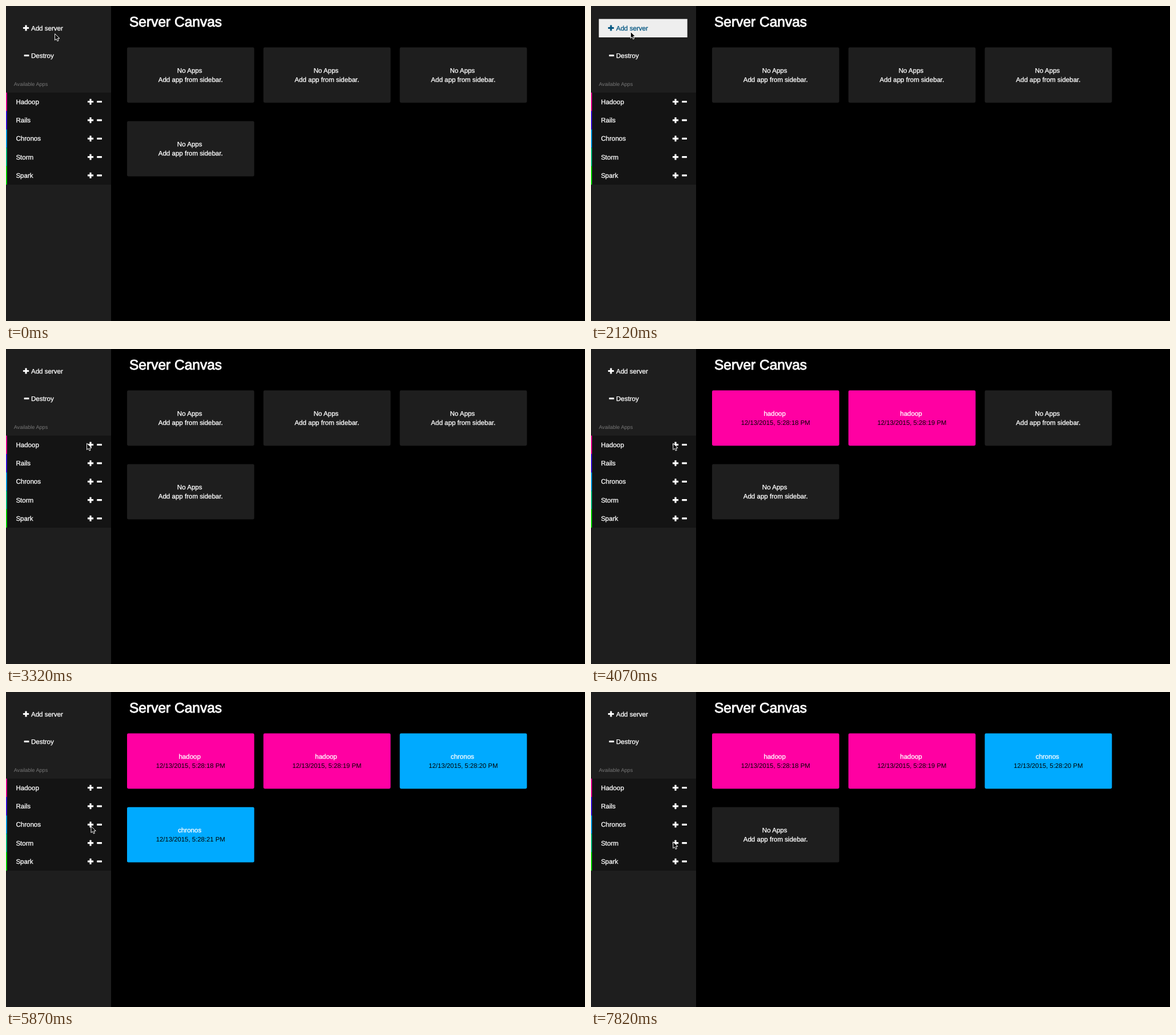
An HTML page for the animation above (8000 ms loop, 1014 by 552 pixels).

```html
<!DOCTYPE html>
<html lang="en">
<head>
<meta charset="utf-8">
<title>Server Canvas</title>
<style>
  html, body { margin: 0; width: 100%; height: 100%; overflow: hidden; background: #000; }
  svg { display: block; width: 100%; height: 100%; }
  text {
    font: 11.55px "Liberation Sans", Arial, sans-serif;
    text-rendering: geometricPrecision;
    fill: #fff; stroke: #fff; stroke-width: .3px;
  }
  .title { font-size: 24.5px; stroke-width: .9px; }
  .label { font-size: 9.1px; fill: #777; stroke: none; }
  .mid { text-anchor: middle; }
  .date { font-size: 11.35px; fill: #000; stroke: none; }
  .icon { fill: #fff; }
  .hover text { fill: #005580; stroke: #005580; }
  .hover .icon { fill: #005580; }
  .back { fill: #eee; visibility: hidden; }
  .hover .back { visibility: visible; }
</style>
</head>
<body>
<svg id="stage" viewBox="0 0 1014 552"></svg>
<script>
const LOOP = 8000, STEP = 150;
const PINK = "#ff00a2", BLUE = "#00aaff", GREY = "#1e1e1e";
const ROW = 32.28, LIST_TOP = 151.7;
const stage = document.getElementById("stage");

function add(parent, tag, attrs = {}, content = "") {
  const el = document.createElementNS("http://www.w3.org/2000/svg", tag);
  for (const key in attrs) el.setAttribute(key, attrs[key]);
  el.textContent = content;
  parent.append(el);
  return el;
}

const rect = (parent, x, y, width, height, more) =>
  add(parent, "rect", { x, y, width, height, ...more });
const label = (parent, x, y, content, cls = "") =>
  add(parent, "text", { x, y, class: cls }, content);
const bar = (parent, x, y, width, height) =>
  rect(parent, x - width / 2, y - height / 2, width, height, { rx: .6, class: "icon" });

function minus(parent, x, y) {
  bar(parent, x, y, 8.8, 3.1);
}

function plus(parent, x, y) {
  bar(parent, x, y, 10.2, 3.1);
  bar(parent, x, y, 3.1, 10.2);
}

function button(y, name, drawIcon, iconX) {
  const group = add(stage, "g");
  rect(group, 13.7, y, 155, ROW, { class: "back" });
  drawIcon(group, iconX, y + 15.8);
  label(group, 44, y + 20, name);
  return { group, y };
}

function card(x, y) {
  const group = add(stage, "g");
  return {
    group,
    box: rect(group, x, y, 222.7, 96.8, { rx: 2.4 }),
    head: label(group, x + 109.7, y + 44.4, "", "mid"),
    foot: label(group, x + 111.2, y + 60.4, "")
  };
}

function setCard({ group, box, head, foot }, app, second) {
  group.setAttribute("visibility", app === "gone" ? "hidden" : "visible");
  const empty = !app || app === "gone";
  box.setAttribute("fill", empty ? GREY : app === "hadoop" ? PINK : BLUE);
  head.textContent = empty ? "No Apps" : app;
  foot.textContent = empty ? "Add app from sidebar." : `12/13/2015, 5:28:${second} PM`;
  foot.setAttribute("class", empty ? "mid" : "mid date");
}

// Sidebar
rect(stage, 0, 0, 184, 552, { fill: GREY });
const buttons = [
  button(22.7, "Add server", plus, 35),
  button(71, "Destroy", minus, 36)
];
label(stage, 13.7, 139.5, "Available Apps", "label");
rect(stage, 0, LIST_TOP, 184, 5 * ROW, { fill: "#141414" });
[["Hadoop", PINK], ["Rails", "#3d14f5"], ["Chronos", BLUE], ["Storm", "#00d28c"], ["Spark", "#00f000"]]
  .forEach(([name, fill], i) => {
    const y = LIST_TOP + i * ROW;
    rect(stage, 0, y, 1.7, ROW, { fill });
    label(stage, 17.4, y + 20.1, name);
    plus(stage, 148, y + 16.1);
    minus(stage, 163.6, y + 16.1);
  });

// Canvas
label(stage, 216, 36.4, "Server Canvas", "title");
const cards = [0, 1, 2, 3].map(i =>
  card(212 + (i % 3) * 238.8, 72.6 + Math.floor(i / 3) * 129.2));

// Pointers, both drawn from their hot spot
const arrow = add(stage, "path", {
  d: "M0 0V11.3L2.6 8.9 4.4 12.9 6.4 12 4.7 8.1H8.3Z",
  fill: "#000", stroke: "#fff", "stroke-width": 1
});
const hand = add(stage, "path", {
  d: "M-1.2 .8Q0-.8 1.1 .8L2 4.4Q3.2 3.4 4 4.7 5.3 4 5.9 5.4 7.3 5 7.4 7L7 10.2 5.8 13.7H-.5L-3.5 9.4-4.6 7.4Q-3.8 6-2.3 7.3L-.2 8.6Z",
  fill: "#fff", stroke: "#000", "stroke-width": .9
});

// The pointer's stops, with the first and last step of the way there
const stops = [
  { from: 0, to: 0, x: 85.6, y: 48.7 },
  { from: 290, to: 290, x: 81, y: 47 },
  { from: 920, to: 1070, x: 78.3, y: 91 },
  { from: 1670, to: 2270, x: 68.8, y: 42.4 },
  { from: 2570, to: 3320, x: 141.6, y: 165.3 },
  { from: 3770, to: 3770, x: 143.8, y: 165.3 },
  { from: 4220, to: 4520, x: 148.8, y: 228 },
  { from: 4820, to: 5270, x: 149, y: 235.3 },
  { from: 6170, to: 6320, x: 168.2, y: 232.6 },
  { from: 6620, to: 6770, x: 162.8, y: 232.6 },
  { from: 7670, to: 7820, x: 143.8, y: 262.6 }
];

const ease = k => k * k * k * (k * (6 * k - 15) + 10);
const between = (t, from, to) => t >= from && t < to;

// The screen was refreshed every STEP, so the way is eased in whole steps
function pointerAt(t) {
  const i = stops.findLastIndex(stop => stop.from <= t);
  const stop = stops[i], last = stops[i - 1] || stop;
  const done = Math.floor((t - stop.from) / STEP) + 1;
  const total = (stop.to - stop.from) / STEP + 1;
  const k = ease(Math.min(1, done / total));
  return {
    x: last.x + (stop.x - last.x) * k,
    y: last.y + (stop.y - last.y) * k,
    resting: t >= stop.to
  };
}

function draw(t) {
  const { x, y, resting } = pointerAt(t);
  const hovered = buttons.find(b => between(x, 14, 169) && between(y, b.y, b.y + ROW) && t >= 290);
  for (const b of buttons) b.group.setAttribute("class", b === hovered ? "hover" : "");

  const shown = hovered && resting ? hand : arrow;
  for (const p of [arrow, hand]) p.setAttribute("visibility", p === shown ? "visible" : "hidden");
  shown.setAttribute("transform", `translate(${x} ${y})`);

  setCard(cards[0], t >= 3470 && "hadoop", 18);
  setCard(cards[1], t >= 4070 && "hadoop", 19);
  setCard(cards[2], t >= 5420 && "chronos", 20);
  setCard(cards[3], between(t, 1520, 2420) ? "gone" : between(t, 5870, 7070) && "chronos", 21);
}

const start = performance.now();
function tick() {
  draw((performance.now() - start) % LOOP);
  requestAnimationFrame(tick);
}
tick();
</script>
</body>
</html>
```
